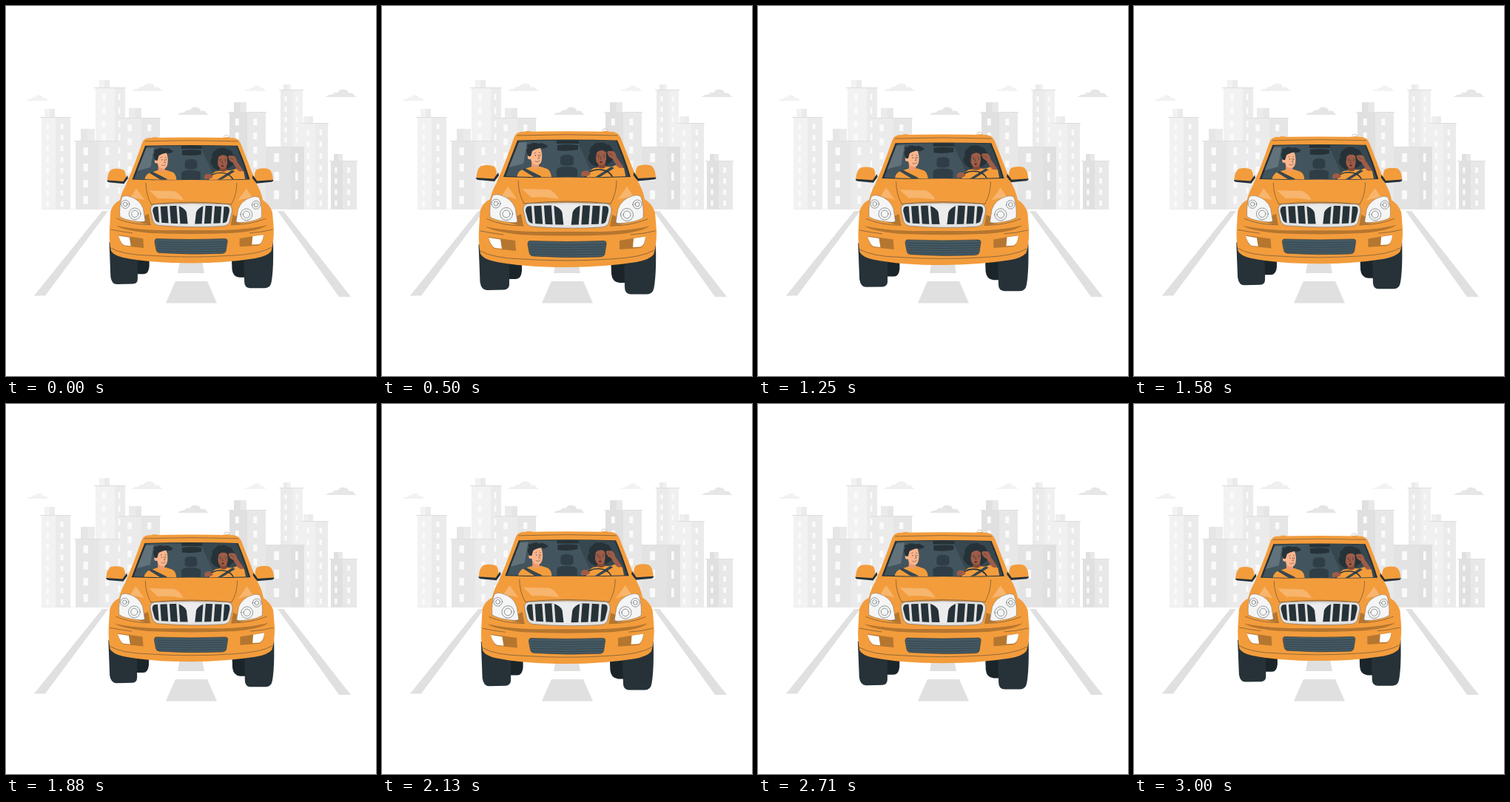
Animation, 500 px wide and 500 px high, one loop 3040 ms. Source, as an HTML page:

```html
<!DOCTYPE html>
<html lang="en">
<head>
<meta charset="utf-8">
<title>City drive</title>
<style>
  html, body { margin: 0; width: 100%; height: 100%; overflow: hidden; background: #fff; }
  svg { display: block; width: 100vw; height: 100vh; }
  .line { fill: none; stroke: #263238; stroke-width: .5; stroke-linecap: round; stroke-linejoin: round; }
  .paint { fill: #f39c3c; }
  .shade { fill: #b5762f; }
  .glow { fill: #f7b56d; }
  .dark { fill: #263238; }
  .glass { fill: #37474f; }
  .lamp { fill: #f5f5f5; stroke: #6d665f; stroke-width: .5; }
</style>
</head>
<body>
<svg viewBox="0 0 500 500">
  <g id="city"></g>
  <g id="clouds"></g>

  <g fill="#e0e0e0">
    <path d="M38 391.500H53L138 277H130Z"/>
    <path d="M450 393H466L375 277H367Z"/>
    <path d="M229 372H272L285 401.500H216Z"/>
    <path d="M236 340H264L268 361H232Z"/>
  </g>

  <g id="car">
    <!-- wheels -->
    <g fill="#1b2529">
      <path d="M163 335H189V358Q188 369 181 369H168Z"/>
      <path d="M309 335H335V374H321Q311 373 310 362Z"/>
    </g>
    <g class="dark">
      <path d="M130.500 322L172 335V376Q172 383 165 383.500L142 384Q134 384 132.500 373Z"/>
      <path d="M327 338L370 322Q371 362 367.500 381Q366 389.500 358 389.500H336Q328 389 328 380Z"/>
    </g>

    <!-- cabin -->
    <path d="M297 171Q298 165.500 302 166T306 171" fill="none" stroke="#d2d2d2" stroke-width="1.200"/>
    <path class="paint" d="M155 238Q166 214 178 179Q180 171 188 170Q250 168.500 312 170Q320 171 323 179L346 238Z"/>
    <path class="paint" d="M194 171V169H201V171ZM299 171V169H306V171Z"/>
    <path class="line" d="M183 175Q250 172.500 318 175"/>
    <path class="dark" d="M183 181.500Q250 179.500 318 181.500Q327 202 336 231Q250 234 164 231Q173 207 183 181.500Z"/>

    <clipPath id="pane"><path d="M185.500 182.500Q250 180.500 316 182.500Q324 202 333 230Q250 233 167 230Q176 207 185.500 182.500Z"/></clipPath>
    <g clip-path="url(#pane)">
      <path fill="#42545d" d="M160 175H340V240H160Z"/>
      <path fill="#62727a" d="M182 185L196 184L191 213L168 219Z"/>
      <path class="glass" d="M262 178H340V240H290Z"/>
      <path d="M241 206Q241 201 250 201T259 206V213Q258 216 250 216T241 213ZM236 221Q238 217 250 217T264 221V233H236Z" fill="#2f3e46"/>
      <path class="dark" d="M236 180H266V186H236ZM237 188Q251 186 265 188V194Q251 197 237 195Z"/>

      <!-- passenger -->
      <path class="paint" d="M182 234Q182 222 193 220L202 217H214L223 220Q229 223 229 234Z"/>
      <path fill="#ed9a6c" d="M202 209H212V219Q207 222 202 218Z"/>
      <path fill="#ffb58c" d="M200 194Q207 189 214 192Q217 198 216 207Q215 215 209 215Q202 214 201 207Q196 208 197 203Q198 200 200 202Z"/>
      <path class="dark" d="M198 203Q193 195 197 191Q194 186 200 187Q204 183 211 186Q217 184 220 187L224 189Q221 194 214 192Q207 193 203 196L201 203Z"/>
      <path class="line" d="M206 199L208 198M212 198L214 199M211 201L212.500 206H210.500M207 210Q210 212 213 209"/>
      <circle class="dark" cx="207.500" cy="202" r=".7"/><circle class="dark" cx="213.500" cy="202" r=".7"/>
      <path class="glass" d="M189 221L193 219L215 230V234H210Z"/>

      <!-- driver -->
      <path class="dark" d="M281 211Q276 205 281 199Q279 192 285 189Q288 184 294 185Q299 183 303 187Q309 187 311 193Q315 198 312 203Q314 209 308 212Q303 217 295 216Q287 219 281 211Z"/>
      <path class="paint" d="M276 234Q277 224 286 219L303 217Q311 218 316 215L327 219L330 234Z"/>
      <path fill="#834936" d="M292 210H302V218Q297 221 292 218Z"/>
      <path fill="#9f5c47" d="M290 198Q296 192 303 197L303 207Q302 215 296 215Q289 214 289 206Z"/>
      <path class="dark" d="M288 203Q289 195 297 195Q303 195 304 202Q307 194 300 191Q290 189 288 203Z"/>
      <path class="line" d="M291 202L294 201.500M299 201L302 202M296 203L295 207H297"/>
      <circle class="dark" cx="293" cy="204" r=".7"/><circle class="dark" cx="300" cy="204" r=".7"/>
      <ellipse cx="296" cy="211" rx="1.800" ry="1.300" fill="#5f2925"/>
      <path fill="#9f5c47" d="M305 200Q303 196 307 196L312 196Q316 198 317 204L326 217Q323 221 318 217L311 206Q306 204 305 200Z"/>
      <path class="line" d="M307 199L312 202"/>
      <path class="glass" d="M310 217L314 219L293 232H287Z"/>
      <path d="M273 234Q278 221 293 221T313 234" fill="none" stroke="#263238" stroke-width="1.600"/>
      <path fill="#9f5c47" d="M269 226Q272 221 279 223L282 227Q278 231 270 230Z"/>
    </g>

    <!-- mirrors -->
    <g id="mirror">
      <path class="paint" d="M127.500 232Q128 220 134 216Q144 213.500 152 217Q155 221 155 229L151 236Z"/>
      <path class="dark" d="M127 232L151 233.500L157 225L158 229L152 237L130 235Q127 234.500 127 232Z"/>
    </g>
    <use href="#mirror" transform="matrix(-1 0 0 1 497.500 -.5)"/>

    <!-- body -->
    <path class="paint" d="M158 234Q250 229 344 234Q352 246 355 261Q365 267 369 279L371 304Q371 325 367 336Q361 343 344 346Q300 353 250 353Q190 353 151 345Q137 342 133 335Q130 319 131 302L132.500 277Q136 266 146 261Q149 247 158 234Z"/>
    <path class="glow" d="M189 247L226 248Q235 252 239 261Q216 257 202 259ZM170 244Q175 250 182 261Q171 257 161 258ZM331 244L341 259Q331 257 318 262Z"/>
    <path class="line" d="M184 236Q184 253 192 267M317 236Q317 253 309 267M192 267Q250 261 309 267M142 288Q163 297 191 297M359 288Q337 297 310 297"/>
    <path class="shade" d="M140 298Q165 304 207 304H296Q337 304 362 297Q351 306 312 309Q250 312 188 309Q149 305 140 298Z"/>
    <path class="paint" d="M144 291Q165 299 197 301H304Q337 299 358 291L359 297Q330 304 295 305H207Q164 304 143 297Z"/>
    <path class="line" d="M133 304Q148 307 164 309M369 304Q353 308 336 309M133 331Q150 341 190 342Q250 346 309 342Q351 340 368 330"/>

    <!-- headlamps -->
    <g id="lamp">
      <path class="shade" d="M168 291L188 281L191 297Q179 296 168 291Z"/>
      <path class="lamp" d="M149 257Q153 253 161 256Q175 260 180 273L183 291Q181 294 170 292Q153 290 146 285Q145 269 149 257Z"/>
      <g class="line">
        <circle cx="154" cy="267" r="6"/><circle cx="154" cy="267" r="3"/>
        <circle cx="168" cy="281" r="8.500"/><circle cx="168" cy="281" r="5"/>
      </g>
    </g>
    <use href="#lamp" transform="matrix(-1 0 0 1 499 1)"/>

    <!-- grille -->
    <path d="M197 267Q250 264 304 267Q311 269 310 278L306 294Q304 298 297 299Q250 302 203 298Q196 297 194 290L191 276Q190 269 197 267Z" fill="#e2e2e2" stroke="#57534e" stroke-width=".5"/>
    <path class="dark" d="M198 270.500Q250 267.500 303 270.500Q307 271 306 278L303 290Q302 294 296 294.500Q250 297 204 294Q198 293 197 288L194 277Q194 271 198 270.500Z"/>
    <g id="bars" stroke="#e2e2e2" stroke-width="3.500"></g>
    <path fill="#ececec" d="M230 269Q250 267 270 269Q260 272 257.500 279L255.500 297H245.500L243.500 279Q241 272 230 269Z"/>

    <!-- bumper -->
    <path fill="#455a64" stroke="#263238" stroke-width=".6" d="M200 317.500Q250 319.500 299 317.500Q304 317.500 303 322L301 335Q300 339 294 339Q250 341 205 338Q200 338 199 333L197 322Q197 317.500 200 317.500Z"/>
    <g id="slats" class="line"></g>
    <path class="shade" d="M144 312L180 317L181 331L153 328Q147 327 144 312ZM321 317L356 311Q356 324 349 327L321 329Z"/>
    <path fill="#fff" d="M144 313L160 315.500L162 328L153 327Q148 326 144 313ZM340 314L356 311.500Q355 324 349 325.500L339 326Z"/>
  </g>
</svg>
<script>
const $ = id => document.getElementById(id);
const rect = (x, y, w, h, fill) => `<rect x="${x}" y="${y}" width="${w}" height="${h}" fill="${fill}"/>`;

// left, corner, right, roof, tank left, tank right, tank top, floor height, two wall tones
const towers = [
  [121, 147, 161, 111, 126, 140, 100, 18, '#f2f2f2', '#ebebeb'],
  [48, 67, 87, 151, 52, 66, 139, 15, '#f2f2f2', '#ebebeb'],
  [155, 183, 208, 152, 166, 183, 138, 19, '#ebebeb', '#e6e6e6'],
  [94, 126, 151, 183, 101, 120, 166, 22, '#e6e6e6', '#ebebeb'],
  [371, 387, 401, 114, 375, 385, 106, 14, '#ebebeb', '#f0f0f0'],
  [401, 418, 435, 159, 402, 415, 149, 16, '#f0f0f0', '#ebebeb'],
  [302, 326, 351, 144, 308, 325, 130, 19, '#e0e0e0', '#e8e8e8'],
  [351, 385, 403, 191, 0, 0, 191, 25, '#e3e3e3', '#e0e0e0'],
  [439, 455, 474, 210, 443, 455, 200, 15, '#e0e0e0', '#e8e8e8']
];

function tower([left, corner, right, roof, tankL, tankR, tankTop, floor, front, side]) {
  const ground = 275;
  const tankMid = (tankL + tankR) / 2;
  let out = rect(tankL, tankTop, tankR - tankL, roof - tankTop, front)
    + rect(tankMid, tankTop, tankR - tankMid, roof - tankTop, side)
    + rect(left, roof, corner - left, ground - roof, front)
    + rect(corner, roof, right - corner, ground - roof, side)
    + rect(left - 2, roof - 1, right - left + 3, 1.2, '#e0e0e0');
  for (let y = roof + 8; y < ground - 9; y += floor) {
    for (const [a, b] of [[left, corner], [corner, right]]) {
      out += rect(a + (b - a) * .33, y, (b - a) * .2, floor * .48, '#fafafa');
    }
  }
  return out;
}
$('city').innerHTML = towers.map(tower).join('') + rect(48, 274.5, 426, .6, '#ebebeb');

const cloud = ([x, y, w, tone]) =>
  `<path transform="translate(${x} ${y}) scale(${w / 42})" fill="${tone}"
    d="M0 11Q4 7 9 8Q11 4 16 5Q20 -1 26 1Q31 2 31 6Q37 4 39 9L42 11Z"/>`;
$('clouds').innerHTML = [
  [27, 120, 31, '#f2f2f2'], [170, 104, 42, '#efefef'], [232, 136, 42, '#e5e5e5'],
  [322, 107, 30, '#f2f2f2'], [432, 112, 42, '#e6e6e6']
].map(cloud).join('');

let bars = '';
for (const side of [-1, 1]) {
  for (let i = 0; i < 3; i++) {
    const x = 19.5 + i * 13.5;
    bars += `<path d="M${250 + side * x} 269L${250 + side * (x - 2)} 296"/>`;
  }
}
$('bars').innerHTML = bars;
$('slats').innerHTML = [0, 1, 2, 3, 4].map(i =>
  `<path d="M${200 + i * .4} ${322 + i * 3.3}Q250 ${324 + i * 3.3} ${301 - i * .4} ${322 + i * 3.3}"/>`).join('');

const LOOP = 3040, FPS = 24, DRAWN_SCALE = 1.087;
const zoomKeys = [[0, 1.005], [580, 1.1], [1780, 1], [2380, 1.1], [3000, 1], [LOOP, 1]];

function zoomAt(t) {
  const i = zoomKeys.findIndex(([end]) => end > t);
  const [t0, a] = zoomKeys[i - 1], [t1, b] = zoomKeys[i];
  return a + (b - a) * (t - t0) / (t1 - t0);
}

const start = performance.now();
function draw(now) {
  const t = Math.max(0, now - start) % LOOP;
  const held = Math.min(3000, Math.floor((t + 6) * FPS / 1000) * 1000 / FPS);
  const k = zoomAt(held) / DRAWN_SCALE;
  $('car').setAttribute('transform', `translate(250 279) scale(${k}) translate(-250 -279)`);
  requestAnimationFrame(draw);
}
draw(start);
</script>
</body>
</html>
```
